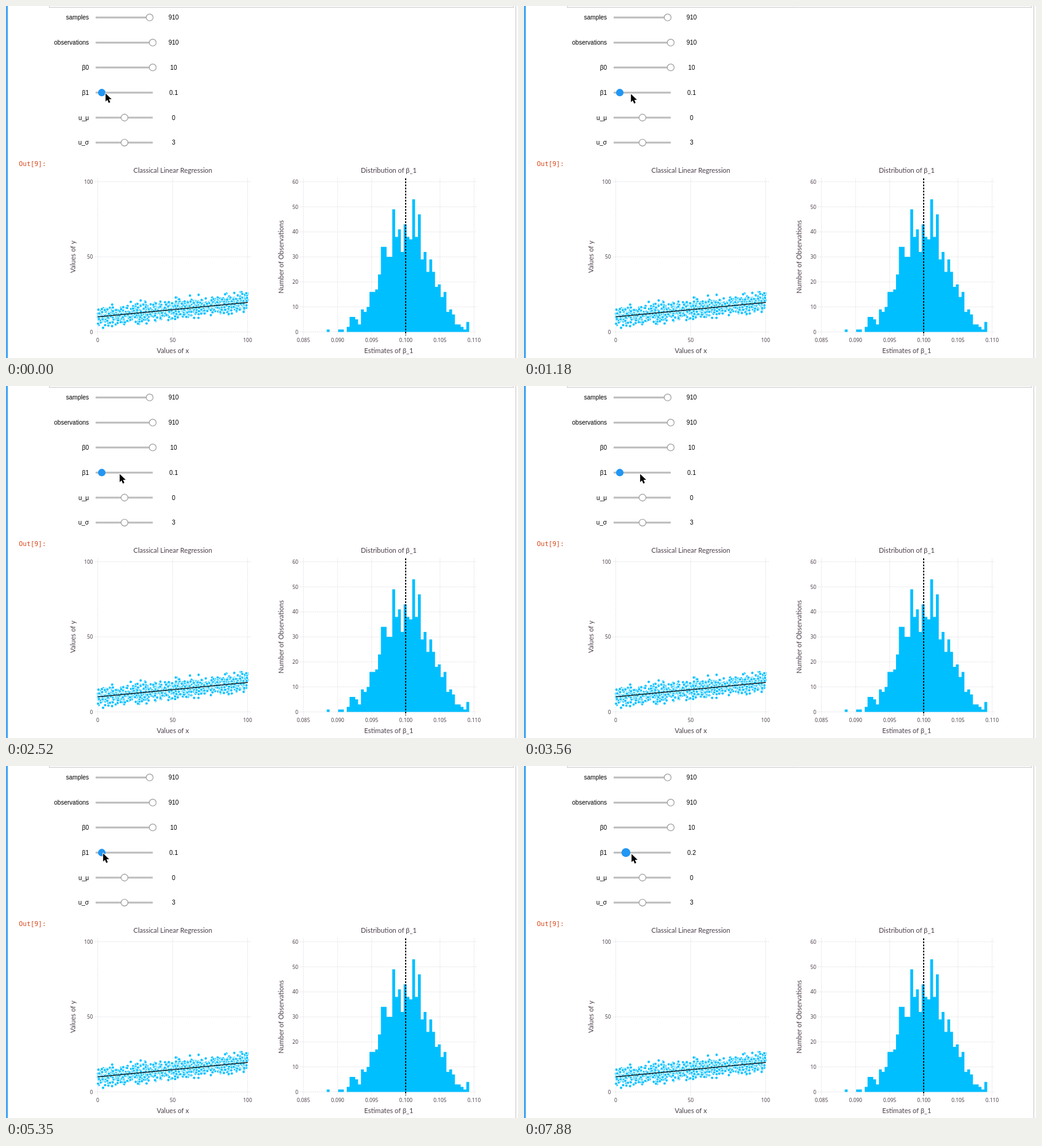
Write an HTML page with a canvas that moves like this. It is 834x574 px and loops after 8000 ms.

```html
<!DOCTYPE html>
<html lang="en">
<head>
<meta charset="utf-8">
<title>Regression sliders</title>
<style>
html, body { margin: 0; width: 100%; height: 100%; overflow: hidden; background: #fff; }
canvas { display: block; }
</style>
</head>
<body>
<canvas id="stage" width="834" height="574"></canvas>
<script>
const W = 834, H = 574, LOOP = 8000;
const SKY = '#00bfff', INK = '#4c404b';
const UI = '10px "Liberation Sans", sans-serif';
const LABEL = '11px Lato, "Noto Sans", sans-serif';
const TICK = '8.4px "Noto Sans", sans-serif';

const stage = document.getElementById('stage').getContext('2d');
const backdrop = document.createElement('canvas');
backdrop.width = W;
backdrop.height = H;
const back = backdrop.getContext('2d');

const counts = [
  1, 0, 0, 0, 1, 1, 0, 2, 6, 6, 5, 3, 9, 8, 10, 16, 16, 17, 23, 34, 34, 30, 30, 49, 38,
  41, 32, 43, 38, 37, 53, 38, 47, 29, 32, 24, 29, 24, 18, 19, 14, 16, 8, 9, 7, 3, 3, 2, 1, 4
];

// Slider rows: label, value, knob x, y
const sliders = [
  ['samples', '910', 234, 18.7],
  ['observations', '910', 239, 59.7],
  ['β0', '10', 239, 100.2],
  ['β1', '', 0, 141.3],
  ['u_μ', '0', 193, 182],
  ['u_σ', '3', 193, 222.8]
];

// Pointer moves: first step, last step, number of steps, end x, end y
const moves = [
  [140, 440, 3, 166, 144], [880, 1180, 3, 173, 142], [1480, 1480, 1, 174, 142],
  [1920, 2520, 5, 184, 142], [2820, 2970, 2, 190, 143], [3560, 3560, 1, 188, 142],
  [3860, 4310, 4, 155, 143], [5060, 5350, 3, 157, 141], [6690, 6840, 2, 164, 142],
  [7590, 7880, 3, 174, 142]
];
const PRESS = 6400, SNAP = 6840;

function text(c, str, x, y, font, color, align = 'center') {
  c.font = font;
  c.fillStyle = color;
  c.textAlign = align;
  c.textBaseline = 'alphabetic';
  c.fillText(str, x, y);
}

function line(c, x1, y1, x2, y2, color, width, dash = []) {
  c.strokeStyle = color;
  c.lineWidth = width;
  c.setLineDash(dash);
  c.beginPath();
  c.moveTo(x1, y1);
  c.lineTo(x2, y2);
  c.stroke();
  c.setLineDash([]);
}

function disc(c, x, y, r, fill, stroke, width = 1) {
  c.beginPath();
  c.arc(x, y, r, 0, 7);
  c.fillStyle = fill;
  c.fill();
  if (!stroke) return;
  c.strokeStyle = stroke;
  c.lineWidth = width;
  c.stroke();
}

function sideText(str, x, y) {
  back.save();
  back.translate(x, y);
  back.rotate(-Math.PI / 2);
  text(back, str, 0, 4, LABEL, INK);
  back.restore();
}

// Titles, dotted grid and tick labels; ticks are [position, label]
function axes(left, right, xTicks, yTicks, title, xName, yName, nameX) {
  const mid = (left + right) / 2, grid = '#dedee6';
  for (const [x, label] of xTicks) {
    line(back, x, 281, x, 537, grid, 1, [1.5, 1.5]);
    text(back, label, x, 547.7, TICK, INK);
  }
  for (const [y, label] of yTicks) {
    line(back, left - 5, y, right + 5, y, grid, 1, [1.5, 1.5]);
    text(back, label, left - 8.5, y + 3, TICK, INK, 'right');
  }
  text(back, title, mid, 272, LABEL, INK);
  text(back, xName, mid, 565.5, LABEL, INK);
  sideText(yName, nameX, 409);
}

function scatter() {
  let seed = 910;
  const rnd = () => (seed = seed * 16807 % 2147483647) / 2147483647;
  axes(150, 393.5, [[149.5, '0'], [271.5, '50'], [393.5, '100']],
    [[286.5, '100'], [409, '50'], [531.5, '0']],
    'Classical Linear Regression', 'Values of x', 'Values of y', 108.5);
  for (let i = 0; i < 910; i++) {
    const u = rnd();
    const noise = (rnd() + rnd() + rnd() + rnd() - 2) * 1.73;
    disc(back, 150 + 243.5 * u, 506.8 - 24 * u - 7.3 * noise, 2.4, SKY, '#fff', 0.9);
  }
  line(back, 150, 506.8, 394, 483.3, '#000', 1.3);
}

function histogram() {
  const xTicks = [], yTicks = [];
  for (let i = 0; i < 6; i++) xTicks.push([484.5 + 55.6 * i, (0.085 + 0.005 * i).toFixed(3)]);
  for (let i = 0; i < 7; i++) yTicks.push([531.5 - 40.8 * i, String(10 * i)]);
  axes(484.5, 762.5, xTicks, yTicks,
    'Distribution of β_1', 'Estimates of β_1', 'Number of Observations', 447.5);
  back.fillStyle = SKY;
  back.beginPath();
  counts.forEach((n, i) => back.rect(522.5 + 4.64 * i, 531.5 - 4.08 * n, 4.64, 4.08 * n));
  back.fill();
  line(back, 651, 281, 651, 537, '#000', 1.8, [3, 2]);
}

function drawBackdrop() {
  back.fillStyle = '#fff';
  back.fillRect(0, 0, W, H);
  back.fillStyle = '#42a5f5';
  back.fillRect(0, 0, 3, H);
  back.fillStyle = '#f7f7f7';
  back.fillRect(70, 0, 757, 2);
  line(back, 70, 2.5, 827, 2.5, '#cfcfcf', 1);
  line(back, 70.5, 0, 70.5, 3, '#cfcfcf', 1);
  line(back, 826.5, 0, 826.5, 3, '#cfcfcf', 1);
  line(back, 830.5, 0, 830.5, H, '#c4c4c4', 1);
  for (const [label, value, x, y] of sliders) {
    text(back, label, 135, y + 3.5, UI, '#000', 'right');
    line(back, 146, y, 239, y, '#bdbdbd', 3);
    if (!value) continue;
    disc(back, x, y, 5.6, '#fff', '#999', 1.1);
    text(back, value, 273, y + 3.5, UI, '#000');
  }
  text(back, 'Out[9]:', 21, 260.5, '10.5px "DejaVu Sans Mono", monospace', '#d84315', 'left');
  scatter();
  histogram();
}

function pointerAt(t) {
  let x = 161, y = 141;
  for (const [start, end, steps, toX, toY] of moves) {
    if (t < start) break;
    const gap = (end - start) / (steps - 1) || 1;
    const part = Math.min(steps, Math.floor((t - start) / gap + 1e-6) + 1) / steps;
    x += (toX - x) * part;
    y += (toY - y) * part;
  }
  return [Math.round(x), Math.round(y)];
}

const arrow = new Path2D('M1.2 1.5V14.8L4.2 12L6.3 17L8.8 16L6.7 11.1H11Z');

function drawPointer(x, y) {
  stage.save();
  stage.translate(x, y);
  stage.lineJoin = 'round';
  stage.lineWidth = 1.8;
  stage.strokeStyle = '#fff';
  stage.stroke(arrow);
  stage.fillStyle = '#000';
  stage.fill(arrow);
  stage.restore();
}

function draw(now) {
  const t = now % LOOP, moved = t >= SNAP;
  stage.drawImage(backdrop, 0, 0);
  disc(stage, moved ? 166 : 156, 141.2, t >= PRESS ? 7.3 : 6.1, '#2196f3');
  text(stage, moved ? '0.2' : '0.1', 273, 144.8, UI, '#000');
  drawPointer(...pointerAt(t));
}

drawBackdrop();
const begin = performance.now();
function tick() {
  draw(performance.now() - begin);
  requestAnimationFrame(tick);
}
tick();
</script>
</body>
</html>
```
